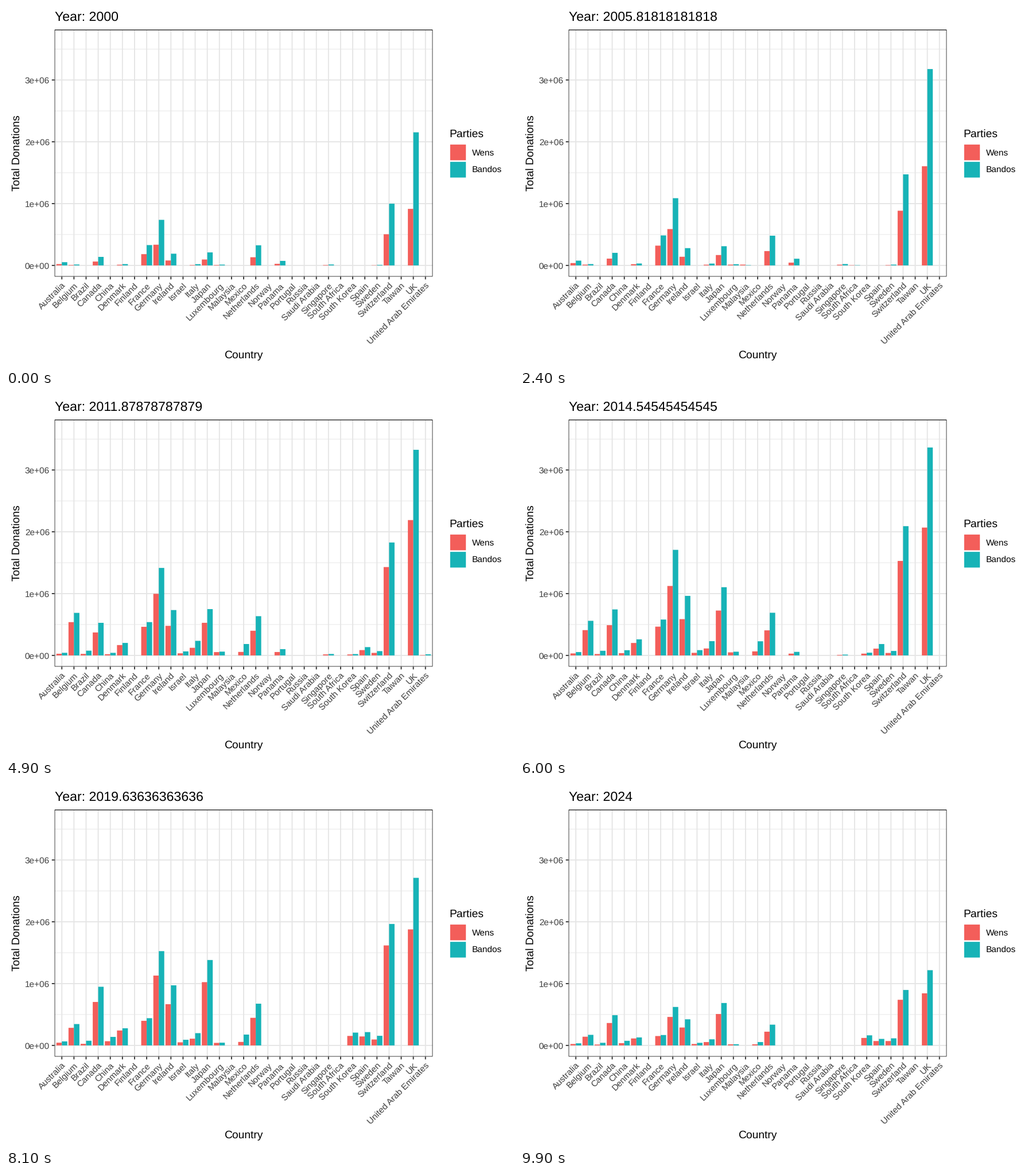
A matplotlib script for the animation above (10000 ms loop, 885x632 px).

```python
import matplotlib.pyplot as plt
import numpy as np
from matplotlib.animation import FuncAnimation
from matplotlib.patches import Rectangle

W, H, DPI = 885, 632, 64
PT = 72 / DPI                       # points per pixel
FRAMES, STEP_MS = 100, 100
FIRST_YEAR, LAST_YEAR = 2000, 2024

LEFT, RIGHT, TOP, BOTTOM = 84.6, 743.4, 41.3, 472.5
ZERO_Y, PX_PER_K = 452.9, 0.1079    # baseline and pixels per thousand

RED, TEAL = "#F35E5A", "#17B3B7"
GRID, DARK, GREY = "#E5E5E5", "#333333", "#404040"
BASE, SMALL, LARGE = 19.25, 15.4, 23.1
THICK, THIN = 1.87, 0.93
TICK = 4.8

plt.rcParams["font.family"] = "Liberation Sans"
plt.rcParams["text.hinting"] = "none"

countries = [
    "Australia", "Belgium", "Brazil", "Canada", "China", "Denmark", "Finland",
    "France", "Germany", "Ireland", "Israel", "Italy", "Japan", "Luxembourg",
    "Malaysia", "Mexico", "Netherlands", "Norway", "Panama", "Portugal",
    "Russia", "Saudi Arabia", "Singapore", "South Africa", "South Korea",
    "Spain", "Sweden", "Switzerland", "Taiwan", "UK", "United Arab Emirates",
]
SLOT = (RIGHT - LEFT) / (len(countries) + 0.2)
BAR = 0.45 * SLOT

fig = plt.figure(figsize=(W / DPI, H / DPI), dpi=DPI, facecolor="white")
ax = fig.add_axes([0, 0, 1, 1])
ax.set_xlim(0, W)
ax.set_ylim(H, 0)
ax.axis("off")


def center_x(i):
    return LEFT + (0.6 + i) * SLOT


def value_y(thousands):
    return ZERO_Y - thousands * PX_PER_K


def line(xs, ys, width, color, z):
    ax.plot(xs, ys, color=color, lw=width * PT, zorder=z,
            solid_capstyle="butt", solid_joinstyle="miter", snap=False)


def label(x, y, s, size, color="black", ha="left", rotation=0):
    return ax.text(x, y, s, fontsize=size * PT, color=color, ha=ha,
                   va="baseline", rotation=rotation, rotation_mode="anchor")


def box(x, y, w, h, color):
    return ax.add_patch(Rectangle((x, y), w, h, facecolor=color, linewidth=0,
                                  zorder=3, snap=False))


# Grid, ticks and axis labels
for v in range(500, 4000, 1000):
    line([LEFT, RIGHT], [value_y(v)] * 2, THIN, GRID, 1)
for m in range(4):
    y = value_y(1000 * m)
    line([LEFT, RIGHT], [y, y], THICK, GRID, 2)
    line([LEFT - TICK, LEFT], [y, y], THICK, DARK, 4)
    label(75.9, y + 5.5, f"{m}e+0{6 if m else 0}", SMALL, GREY, "right")
for i, name in enumerate(countries):
    x = center_x(i)
    line([x, x], [TOP, BOTTOM], THICK, GRID, 2)
    line([x, x], [BOTTOM, BOTTOM + TICK], THICK, DARK, 4)
    label(x + 7.8, 489, name, SMALL, GREY, "right", 45)

e = THIN / 2
l, r, t, b = LEFT + e, RIGHT - e, TOP + e, BOTTOM - e
line([l, r, r, l, l, r], [t, t, b, b, t, t], THIN, DARK, 5)

# Titles and legend
title = label(LEFT, 26, "", LARGE)
label((LEFT + RIGHT) / 2, 614.8, "Country", BASE, ha="center")
label(23.5, (TOP + BOTTOM) / 2, "Total Donations", BASE, ha="center",
      rotation=90)
label(772.5, 229, "Parties", BASE)
for y, color, party in ((255.6, RED, "Wens"), (285.8, TEAL, "Bandos")):
    box(773.8, y - 13.7, 27.4, 27.4, color)
    label(812.2, y + 5.5, party, SMALL)

# Shared trends: overall level, and how far the second party leads the first
steps = np.arange(FRAMES)
TURNS = [0, 24, 35, 49, 71, 91, 99]
level = np.interp(steps, TURNS, [0.57, 1, 1, 0.9, 1, 1, 0.46])
swing = np.interp(steps, TURNS, [2.2, 1.85, 0.97, 1.42, 1.62, 1.08, 1.35])
bars = []


def add(name, reds, teals):
    x = center_x(countries.index(name))
    for left, color, values in ((x - BAR, RED, reds), (x, TEAL, teals)):
        bars.append((box(left, ZERO_Y, BAR, 0, color), values))


def donor(name, lean, *points):
    """Four key amounts in thousands; lean scales the second party."""
    reds = level * np.interp(steps, [24, 35, 71, 91], points)
    add(name, reds, reds * swing * lean)


def blip(name, peak, red, teal):
    """A single small donation round that rises and falls."""
    bump = np.clip(1 - abs(steps - peak) / 8, 0, 1)
    add(name, red * bump, teal * bump)


donor("Australia", 1.1, 38, 25, 38, 50)
donor("Belgium", 0.9, 13, 812, 263, 306)
donor("Brazil", 2.2, 0, 32, 20, 31)
donor("Canada", 1, 110, 282, 618, 788)
donor("China", 1.5, 0, 0, 56, 80)
donor("Denmark", 0.85, 20, 153, 238, 245)
donor("France", 0.82, 320, 545, 466, 330)
donor("Germany", 1, 588, 1012, 1258, 1002)
donor("Ireland", 1.08, 140, 422, 704, 630)
donor("Israel", 1.35, 0, 30, 50, 50)
donor("Italy", 1.35, 12, 160, 100, 118)
donor("Japan", 1, 168, 360, 942, 1105)
donor("Luxembourg", 0.8, 13, 70, 44, 38)
donor("Mexico", 2.3, 0, 55, 75, 38)
donor("Netherlands", 1.12, 232, 465, 410, 483)
donor("Panama", 1.3, 45, 100, 0, 0)
donor("Singapore", 1, 12, 30, 0, 0)
donor("South Korea", 1, 0, 0, 44, 263)
donor("Spain", 1.1, 0, 70, 136, 154)
donor("Sweden", 1.2, 6, 50, 38, 154)
donor("Switzerland", 0.9, 885, 1562, 1630, 1605)
donor("UK", 1.07, 1605, 2758, 1922, 1832)

blip("Malaysia", 24, 13, 5)
blip("South Africa", 24, 4, 4)
blip("United Arab Emirates", 49, 6, 18)
blip("Finland", 71, 5, 26)
blip("Norway", 71, 5, 8)
blip("Portugal", 91, 18, 4)
blip("Saudi Arabia", 91, 8, 2)
blip("Taiwan", 91, 7, 0)


def update(n):
    year = FIRST_YEAR + n * (LAST_YEAR - FIRST_YEAR) / (FRAMES - 1)
    title.set_text(f"Year: {year:.15g}")
    for bar, values in bars:
        bar.set_height(-PX_PER_K * values[n])
    return [title]


anim = FuncAnimation(fig, update, frames=FRAMES, interval=STEP_MS,
                     repeat=True, repeat_delay=0)
plt.show()
```
